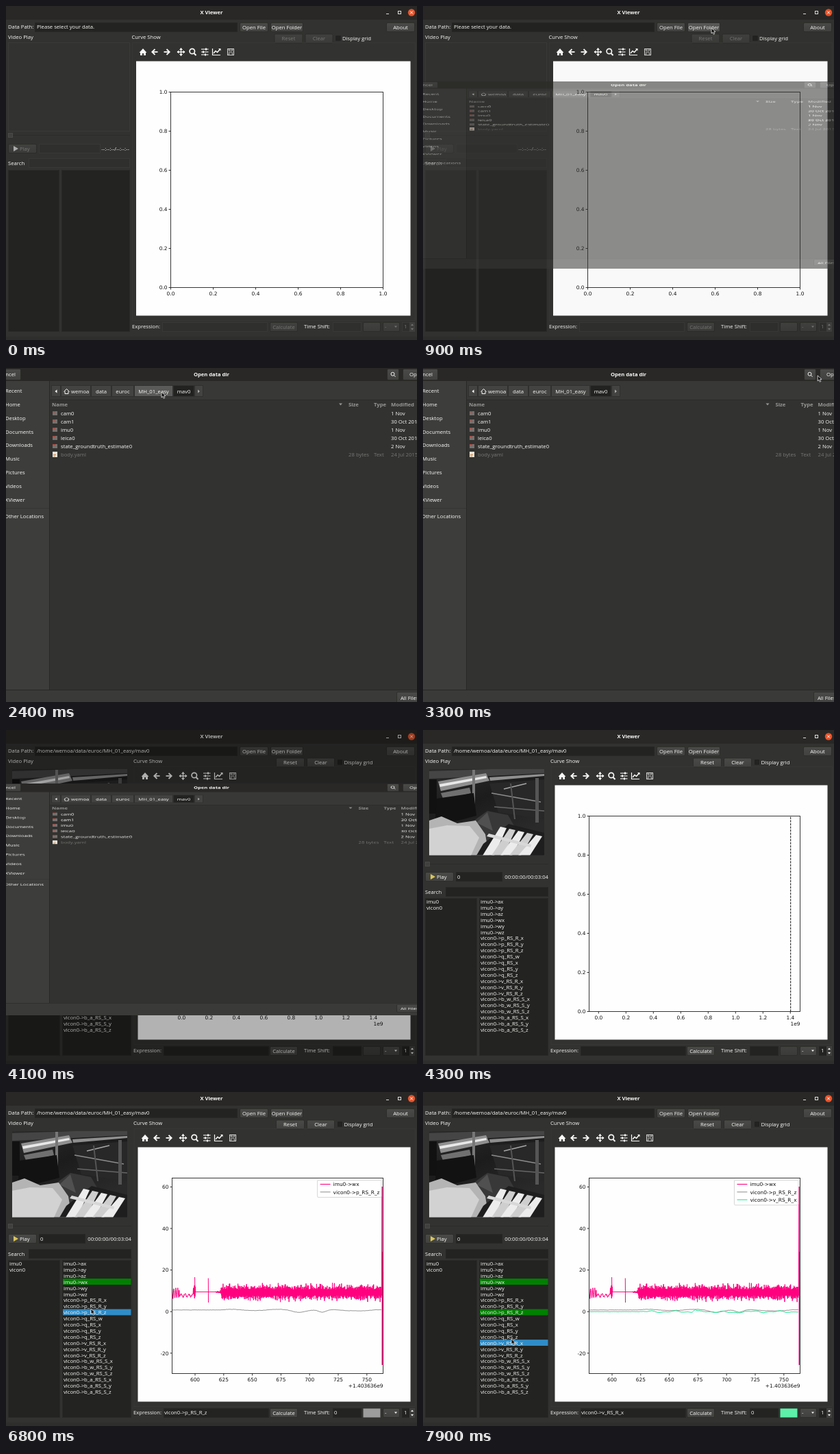
Animation, 600 px wide and 487 px high, one loop 8 s. Source, as an HTML page with a canvas:

```html
<!DOCTYPE html>
<html lang="en">
<head>
<meta charset="utf-8">
<title>X Viewer</title>
<style>
html, body { margin: 0; width: 100%; height: 100%; overflow: hidden; background: #323230; }
canvas { display: block; width: 600px; height: 487px; }
</style>
</head>
<body>
<canvas id="stage" width="600" height="487"></canvas>
<script>
const W = 600, H = 487, DIALOG_H = 496, LOOP = 8000, STEP = 100;
const screen2d = document.getElementById('stage').getContext('2d');
const layer = document.createElement('canvas');
layer.width = W; layer.height = DIALOG_H;
const layer2d = layer.getContext('2d');
let ctx = screen2d;

const UI = '7.7px "Open Sans", "Noto Sans", sans-serif';
const BOLD = 'bold 7.6px "Open Sans", "Noto Sans", sans-serif';
const PLOT = '7.4px "DejaVu Sans", sans-serif';
const BG = '#323230', FIELD = '#232321', TEXT = '#fafaf8', DIM = '#777775';
const USER = 'wemoa';
const DATA_PATH = `/home/${USER}/data/euroc/MH_01_easy/mav0`;

const axes3 = (prefix) => ['x', 'y', 'z'].map((a) => prefix + a);
const SIGNALS = [
  ...axes3('imu0->a'), ...axes3('imu0->w'), ...axes3('vicon0->p_RS_R_'),
  'vicon0->q_RS_w', ...axes3('vicon0->q_RS_'), ...axes3('vicon0->v_RS_R_'),
  ...axes3('vicon0->b_w_RS_S_'), ...axes3('vicon0->b_a_RS_S_')
];

function rect(x, y, w, h, fill, stroke) {
  if (fill) { ctx.fillStyle = fill; ctx.fillRect(x, y, w, h); }
  if (stroke) {
    ctx.strokeStyle = stroke; ctx.lineWidth = 1;
    ctx.strokeRect(x + .5, y + .5, w - 1, h - 1);
  }
}
function text(s, x, y, color = TEXT, align = 'left', font = UI) {
  ctx.font = font; ctx.fillStyle = color; ctx.textAlign = align;
  ctx.fillText(s, x, y + 2.8);
}
function trace(points) {
  ctx.beginPath();
  for (let i = 0; i < points.length; i += 2) ctx.lineTo(points[i], points[i + 1]);
}
function poly(points, fill) {
  trace(points); ctx.closePath(); ctx.fillStyle = fill; ctx.fill();
}
function line(points, color = TEXT, width = 1) {
  trace(points); ctx.strokeStyle = color; ctx.lineWidth = width; ctx.stroke();
}
function disc(x, y, r, fill, stroke, width = 1) {
  ctx.beginPath(); ctx.arc(x, y, r, 0, Math.PI * 2);
  if (fill) { ctx.fillStyle = fill; ctx.fill(); }
  if (stroke) { ctx.strokeStyle = stroke; ctx.lineWidth = width; ctx.stroke(); }
}
function button(label, x, y, w, h, on = true, hover = false) {
  const g = ctx.createLinearGradient(0, y, 0, y + h);
  g.addColorStop(0, hover ? '#5c5c5a' : on ? '#4a4a48' : '#41413f');
  g.addColorStop(1, hover ? '#50504e' : on ? '#41413f' : '#3a3a38');
  ctx.beginPath(); ctx.roundRect(x + .5, y + .5, w - 1, h - 1, 1.5);
  ctx.fillStyle = g; ctx.fill();
  ctx.strokeStyle = '#2a2a28'; ctx.lineWidth = .8; ctx.stroke();
  text(label, x + w / 2, y + h / 2, on ? TEXT : DIM, 'center');
}
const field = (x, y, w, h, on = true) => rect(x, y, w, h, on ? FIELD : '#2f2f2d', on ? '#272725' : '#383836');

function seeded(seed) {
  return () => {
    seed = (seed * 1664525 + 1013904223) >>> 0;
    return seed / 4294967296;
  };
}

// Gyro curve: calm start, two jolts, dense noise, then one huge spike.
function gyroPath() {
  const rnd = seeded(7), p = new Path2D();
  let sign = 1;
  for (let x = 242; x < 548.5; x += .35) {
    const r = rnd();
    let y;
    sign = -sign;
    if (x < 253) y = 293 + 7 * Math.sin(x * 2.3) + 4 * (r - .5);
    else if (x < 273.5) y = 296.5 + 2 * Math.sin(x * 1.1) + 3 * (r - .5);
    else if (x < 276.5) y = 289 + sign * 10 * (1 - Math.abs(x - 275.3) / 3) + r * 3;
    else if (x < 314) y = 291.5 + sign * (.4 + Math.max(0, x - 305) * .25 * r);
    else y = 292.3 + sign * (4 + 6 * r + 4 * r ** 14);
    p.lineTo(x, y);
  }
  for (const [x, y] of [[549, 138], [549.2, 398], [549.6, 233], [550, 320], [550.4, 262], [551, 293]]) p.lineTo(x, y);
  p.moveTo(275.6, 270); p.lineTo(275.8, 299);
  p.moveTo(295.3, 271.5); p.lineTo(295.5, 307);
  return p;
}
function slowPath(base, swell, seed) {
  const rnd = seeded(seed), p = new Path2D();
  for (let x = 242; x < 549; x++) {
    const moving = Math.min(1, Math.max(0, (x - 312) / 10));
    p.lineTo(x, base + moving * swell(x) + (rnd() - .5) * .5);
  }
  return p;
}
const bump = (x, c, w) => Math.exp(-(((x - c) / w) ** 2));
const CURVES = [
  { at: 5400, row: 3, color: '#ff007f', button: '#ff63b1', path: gyroPath() },
  { at: 6700, row: 8, color: '#969696', button: '#9c9c9c',
    path: slowPath(317.8, (x) => .9 * Math.sin(x / 11) + 2.6 * bump(x, 427, 12) + 4 * bump(x, 462, 8) + 1.6 * bump(x, 525, 15), 3) },
  { at: 7500, row: 13, color: '#1fe896', button: '#5cf0a8',
    path: slowPath(320.3, (x) => .9 * Math.sin(x / 6) + .6 * Math.sin(x / 2.7) - 3 * bump(x, 397, 2.5) + 1.5 * bump(x, 450, 9), 11) }
];

function windowButtons() {
  line([555, 11.5, 559, 11.5], '#ddd');
  ctx.strokeStyle = '#ddd'; ctx.lineWidth = 1; ctx.strokeRect(572.5, 7.5, 4, 4);
  disc(592, 9.5, 5.2, '#e5532a');
  line([590, 7.5, 594, 11.5], '#fff'); line([594, 7.5, 590, 11.5], '#fff');
}

function arrow(x, dir) {
  line([x - 4 * dir, 67, x + 4 * dir, 67], TEXT, 1.8);
  line([x, 63, x - 0 + 4.2 * dir, 67, x, 71], TEXT, 1.8);
}
function toolbar(dx) {
  ctx.save(); ctx.translate(dx, 0);
  poly([194.5, 68, 200, 62, 205.5, 68, 204, 68, 204, 72, 201, 72, 201, 69, 199, 69, 199, 72, 196, 72, 196, 68], TEXT);
  arrow(217.5, -1); arrow(234.5, 1);
  line([250, 67, 261, 67], TEXT, 1.4); line([255.5, 61.5, 255.5, 72.5], TEXT, 1.4);
  for (let i = 0; i < 4; i++) {
    ctx.save(); ctx.translate(255.5, 67); ctx.rotate(i * Math.PI / 2);
    poly([6, 0, 3, -2.5, 3, 2.5], TEXT); ctx.restore();
  }
  disc(271.8, 66, 3.7, null, TEXT, 1.7); line([274.5, 69, 277.5, 72], TEXT, 2);
  [[63, 292], [67, 288], [71, 291]].forEach(([y, x]) => {
    line([285, y, 295.5, y], TEXT, 1.1); rect(x - 1, y - 1.5, 2, 3, TEXT);
  });
  line([301.5, 62, 301.5, 71.5, 313, 71.5], TEXT, 1.2);
  line([303, 69, 306, 65.5, 308.5, 67.5, 312.5, 63], TEXT, 1.5); poly([310, 62, 313.5, 62, 313.5, 65.5], TEXT);
  ctx.strokeStyle = '#d8d8d6'; ctx.lineWidth = 1; ctx.strokeRect(323.5, 62.5, 9, 9);
  ctx.lineWidth = .8; ctx.strokeRect(325.5, 63, 5, 2.5); ctx.strokeRect(325.5, 68, 5, 3.5);
  ctx.restore();
}

function photo() {
  ctx.save();
  ctx.beginPath(); ctx.rect(9, 57, 168, 125.5); ctx.clip();
  const g = ctx.createLinearGradient(9, 57, 60, 183);
  g.addColorStop(0, '#2c2c2c'); g.addColorStop(.5, '#1c1c1c'); g.addColorStop(1, '#2a2a2a');
  rect(9, 57, 168, 126, g);
  poly([9, 60, 100, 57, 177, 57, 177, 63, 60, 69, 9, 71], '#454545');
  poly([22, 75, 92, 63, 97, 74, 26, 89], '#8f8f8f');
  poly([24, 79, 92, 67, 93, 70, 25, 83], '#e8e8e8');
  poly([97, 69, 177, 64, 177, 67, 98, 74], '#8f8f8f');
  poly([26, 92, 68, 84, 70, 92, 30, 102], '#707070');
  rect(9, 72, 11, 50, '#111'); rect(72, 58, 4, 52, '#777');
  poly([20, 100, 74, 92, 78, 125, 40, 135, 18, 128], '#121212');
  poly([97, 78, 177, 72, 177, 130, 110, 120], '#282828');
  line([100, 92, 172, 105], '#8c8c8c', 1.5); line([118, 86, 151, 78], '#a8a8a8', 1.5);
  line([104, 112, 177, 118], '#666', 1.5); line([128, 78, 134, 130], '#555', 2);
  rect(164, 70, 5, 65, '#555');
  poly([66, 138, 94, 118, 124, 124, 138, 148, 108, 160, 82, 166], '#383838');
  poly([78, 135, 94, 120, 102, 147], '#505050');
  poly([9, 132, 27, 126, 50, 136, 77, 132, 91, 152, 96, 183, 9, 183], '#b4b4b4');
  poly([9, 144, 35, 139, 68, 140, 82, 157, 70, 183, 9, 183], '#d2d2d2');
  poly([88, 166, 125, 137, 177, 150, 177, 183, 78, 183], '#1e1e1e');
  for (let i = 0; i < 5; i++) {
    const x = 113 + i * 13, y = 141 + i * 3;
    poly([x, y, x + 9, y + 2, x - 9, 183, x - 26, 183], i % 2 ? '#cecece' : '#ececec');
  }
  poly([96, 151, 158, 167, 157, 171, 93, 155], '#d8d8d8');
  ctx.restore();
}

function tick(label, x, y, vertical) {
  if (vertical) {
    line([x, y, x, y + 3], '#000', .8);
    text(label, x, y + 8.5, '#111', 'center', PLOT);
  } else {
    line([x - 3, y, x, y], '#000', .8);
    text(label, x - 5, y, '#111', 'right', PLOT);
  }
}
function legend(curves) {
  ctx.font = PLOT;
  const wide = Math.max(...curves.map((c) => ctx.measureText(SIGNALS[c.row]).width));
  const left = 545.5 - wide;
  ctx.beginPath(); ctx.roundRect(left - 23, 128.5, wide + 25.5, curves.length * 11.3 + 2.5, 1.5);
  ctx.fillStyle = 'rgba(255,255,255,.85)'; ctx.fill();
  ctx.strokeStyle = '#ccc'; ctx.lineWidth = .8; ctx.stroke();
  curves.forEach((c, i) => {
    const y = 134.5 + i * 11.3;
    line([left - 19, y, left - 4, y], c.color, 1.1);
    text(SIGNALS[c.row], left, y, '#111', 'left', PLOT);
  });
}
function plot(loaded, curves) {
  const x0 = loaded ? 242.5 : 240.5, x1 = 550.5, y0 = 125.5, y1 = 410.5;
  const left = loaded ? 192.5 : 190;
  rect(left, 80.5, 590.5 - left, 371, '#fefefe');
  if (curves.length) {
    for (let v = 600; v <= 750; v += 25) tick(v, 276 + (v - 600) * 1.672, y1, true);
    for (let v = -20; v <= 60; v += 20) tick(v, x0, 320.2 - v * 3.03, false);
    text('+1.403636e9', x1, 428.5, '#111', 'right', PLOT);
    ctx.save(); ctx.beginPath(); ctx.rect(x0, y0, x1 - x0, y1 - y0); ctx.clip();
    ctx.lineWidth = 1; ctx.lineJoin = 'round';
    curves.forEach((c) => { ctx.strokeStyle = c.color; ctx.stroke(c.path); });
    ctx.restore();
  } else {
    const n = loaded ? 7 : 5;
    for (let i = 0; i <= n; i++) tick((i * .2).toFixed(1), loaded ? 256.3 + i * 40 : x0 + i * 62, y1, true);
    for (let i = 0; i <= 5; i++) tick((i * .2).toFixed(1), x0, y1 - i * 57, false);
    if (loaded) {
      text('1e9', x1, 428.5, '#111', 'right', PLOT);
      ctx.setLineDash([3.2, 1.4]); line([536.7, y1, 536.7, y0], '#111', 1); ctx.setLineDash([]);
    }
  }
  ctx.strokeStyle = '#222'; ctx.lineWidth = .9; ctx.strokeRect(x0, y0, x1 - x0, y1 - y0);
  if (curves.length) legend(curves);
}

function leftPane(loaded, curves) {
  const dy = loaded ? 7 : 0, right = loaded ? 183 : 181;
  text('Video Play', 3, 45);
  if (loaded) photo(); else rect(3, 53, 178, 130, null, '#3a3a38');
  rect(10, 188 + dy, right - 10, 1, '#2b2b29'); rect(3, 185 + dy, 7, 7, '#40403e', '#4a4a48');
  const py = loaded ? 207 : 201;
  button('', 3, py, 42, 14, loaded);
  poly([11, py + 3, 18, py + 7, 11, py + 11], loaded ? '#d8c45a' : '#aaa');
  text('Play', 20, py + 7, loaded ? TEXT : DIM);
  field(48, py, loaded ? 68 : 90, 14, loaded);
  if (loaded) text('0', 50, py + 7);
  text(loaded ? '00:00:00/00:03:04' : '--:--:--/--:--:--', loaded ? 183 : 180, py + 7, TEXT, 'right');
  text('Search', 3, 229 + dy);
  field(33, 222 + dy, right - 33, 14, loaded);
  const top = loaded ? 245 : 239, mid = loaded ? 82 : 81;
  rect(3, top, mid - 6, 475 - top, FIELD, '#292927');
  rect(mid, top, right - mid, 475 - top, FIELD, '#292927');
  if (!loaded) return;
  text('imu0', 5, 250); text('vicon0', 5, 259);
  curves.forEach((c, i) => rect(83, 245.4 + c.row * 8.9, 99.5, 8.9, i === curves.length - 1 ? '#308cc6' : '#008000'));
  SIGNALS.forEach((s, i) => text(s, 84, 250.2 + i * 8.9));
}

function bottomRow(loaded, curves) {
  const last = curves[curves.length - 1], dx = loaded ? 2 : 0, color = loaded ? TEXT : DIM;
  text('Expression:', 184 + dx, 467.5);
  field(228 + dx, 461, 154, 14, loaded);
  button('Calculate', 385, 461, 41, 14, loaded);
  text('Time Shift:', 435, 467.5);
  field(477, 461, 42, 14, loaded);
  button('', 521, 461, 26, 14, false);
  button('', 550, 461, 25, 14, loaded);
  text('-', 553, 467.5, color);
  poly([567, 466.5, 571, 466.5, 569, 469], color);
  field(578, 461, 19, 14, loaded);
  text('1', 581, 467.5, color);
  rect(589, 461, 8, 14, '#3f3f3d');
  poly([591, 466, 595, 466, 593, 463.5], color); poly([591, 470, 595, 470, 593, 472.5], color);
  if (!last) return;
  text(SIGNALS[last.row], 231, 467.5);
  text('0', 479, 467.5);
  rect(521.5, 461.5, 25, 13, last.button);
}

function mainWindow(loaded, curves, hover) {
  const dx = loaded ? 2.5 : 0;
  rect(0, 0, W, H, BG);
  rect(0, 0, W, 20, '#292826');
  text('X Viewer', 300, 9.5, TEXT, 'center', BOLD);
  windowButtons();
  text('Data Path:', 3, 30.5);
  field(42, 24, 296, 14);
  text(loaded ? DATA_PATH : 'Please select your data.', 45, 30.5);
  button('Open File', 341, 24, 42, 14);
  button('Open Folder', 386, 24, 48, 14, true, hover);
  button('About', 555, 24, 42, 14);
  text('Curve Show', 183.5 + dx, 45);
  button('Reset', 391.5 + dx, 40.5, 42, 14, loaded);
  button('Clear', 436.5 + dx, 40.5, 41, 14, loaded);
  rect(481.5 + dx, 43.5, 7, 7, '#232321', '#202020');
  text('Display grid', 491 + dx, 47.5);
  rect(184 + dx, 53, 414 - dx, 406, null, '#373735');
  toolbar(loaded ? 3 : 0);
  plot(loaded, curves);
  leftPane(loaded, curves);
  bottomRow(loaded, curves);
  rect(0, 482, W, 5, '#2e2e2c');
}

const FILES = [['cam0', '1 Nov'], ['cam1', '30 Oct 2015'], ['imu0', '1 Nov'], ['leica0', '30 Oct 2015'],
  ['state_groundtruth_estimate0', '2 Nov'], ['body.yaml', '24 Jul 2015']];
const PLACES = ['Recent', 'Home', 'Desktop', 'Documents', 'Downloads', 'Music', 'Pictures', 'Videos', 'XViewer'];

function pathBar(hover) {
  const crumbs = [['', 66, 14], ['', 80, 44], ['data', 124, 30], ['euroc', 154, 33], ['MH_01_easy', 187, 57], ['mav0', 244, 31], ['', 275, 13]];
  crumbs.forEach(([label, x, w]) => {
    const fill = label === 'mav0' ? '#222220' : hover && label === 'MH_01_easy' ? '#5a5a58' : '#434341';
    rect(x, 25, w, 17, fill, '#30302e');
    text(label, x + w / 2, 34, TEXT, 'center');
  });
  poly([74.5, 31.5, 74.5, 36.5, 71.5, 34], TEXT);
  poly([280, 31.5, 280, 36.5, 283, 34], '#aaa');
  line([84.5, 34.5, 88.5, 30.5, 92.5, 34.5], TEXT); line([86, 34, 86, 37.5, 91, 37.5, 91, 34], TEXT);
  text(USER, 95, 34);
}
function dialog(dx, hover) {
  const grey = '#979795', small = 'bold ' + UI;
  rect(0, 0, W, DIALOG_H, BG);
  rect(0, 0, W, 19, '#292826');
  button('', -30, 1, 52, 17); text('Cancel', 14, 9.5, TEXT, 'right');
  text('Open data dir', 300, 9.5, TEXT, 'center', BOLD);
  button('', 556, 1, 18, 17);
  disc(564.5, 8.8, 2.5, null, TEXT); line([566.5, 10.8, 568.5, 12.8], TEXT);
  button('', 579, 1, 60, 17); text('Open', 589, 9.5);
  rect(0, 19, 63, 450, '#3d3d3b'); rect(63, 19, 1, 450, '#282826');
  PLACES.forEach((p, i) => text(p, -1, 33 + i * 19.9));
  rect(0, 204, 63, 1, '#353533');
  text('Other Locations', -2, 216.5);
  rect(64, 19, W, 28, '#383836'); rect(64, 46, W, 1, '#2b2b29');
  pathBar(hover);
  text('Name', 67, 53, grey, 'left', small);
  poly([486 + dx, 51.5, 491 + dx, 51.5, 488.5 + dx, 54.5], grey);
  text('Size', 500 + dx, 53, grey, 'left', small);
  text('Type', 537 + dx, 53, grey, 'left', small);
  text('Modified', 562 + dx, 53, grey, 'left', small);
  FILES.forEach(([name, date], i) => {
    const y = 66 + i * 12, isFile = i === 5, color = isFile ? DIM : TEXT;
    if (isFile) {
      rect(68, y - 4, 7, 8, '#e8e2d8'); rect(69, y, 4, 1, '#d0803c'); rect(69, y + 2, 3, 1, '#c8a070');
    } else {
      rect(68, y - 3, 7, 6, '#74716f'); rect(68, y - 3, 4, 1.5, '#b5473c');
    }
    text(name, 80, y, color);
    text(date, 562 + dx, y, color);
  });
  text('28 bytes', 530 + dx, 126, DIM, 'right');
  text('Text', 537 + dx, 126, DIM);
  rect(0, 469, W, 27, '#3a3a38'); rect(0, 469, W, 1, '#272725');
  button('', 570, 472, 60, 17); text('All Files', 576, 481);
}

const CURSOR = [[100, 520, 200], [700, 421, 32], [1200, 421, 32], [1800, 262, 72], [2200, 227, 35], [2800, 227, 35],
  [3400, 604, 9], [4400, 604, 9], [5200, 123, 271], [6000, 123, 271], [6500, 124, 316], [7000, 124, 316], [7400, 129, 360], [8000, 129, 360]];
const SCALE = [[800, 0], [900, .55], [1000, .88], [1100, 1], [3900, 1], [4000, .9], [4100, .683], [4200, .32], [4300, 0]];
const SHADE = [[800, 0], [900, .02], [1100, .3], [4100, .3], [4300, 0]];

function sample(keys, t, ease = (u) => u) {
  if (t <= keys[0][0]) return keys[0].slice(1);
  const i = keys.findIndex((k) => k[0] >= t);
  if (i < 0) return keys[keys.length - 1].slice(1);
  const a = keys[i - 1], b = keys[i], u = ease((t - a[0]) / (b[0] - a[0]));
  return a.slice(1).map((v, j) => v + (b[j + 1] - v) * u);
}

function pointer(x, y) {
  ctx.save(); ctx.translate(x, y);
  const shape = [0, 0, 0, 8, 1.9, 6.4, 3.2, 9.3, 4.7, 8.6, 3.5, 5.8, 6, 5.6];
  poly(shape, '#111');
  line([...shape, 0, 0], '#eee', .8);
  ctx.restore();
}

// The dialog opens and closes by squashing towards its middle; it fades only on opening.
function showDialog(scale, alpha, dx, hover) {
  const middle = 244.5;
  ctx = layer2d;
  dialog(dx, hover);
  ctx = screen2d;
  ctx.globalAlpha = alpha;
  ctx.drawImage(layer, 0, middle * (1 - scale), W, DIALOG_H * scale);
  ctx.globalAlpha = 1;
}

function draw(t) {
  const [cx, cy] = sample(CURSOR, t, (u) => u * u * (3 - 2 * u));
  const over = (x, y, w, h) => cx >= x && cx < x + w && cy >= y && cy < y + h;
  const [scale] = sample(SCALE, t), [shade] = sample(SHADE, t);
  const opening = t < 2000;
  mainWindow(!opening, CURVES.filter((c) => t >= c.at), opening && over(386, 24, 48, 14));
  if (shade) rect(0, 0, W, H, `rgba(0,0,0,${shade})`);
  if (scale) showDialog(scale, opening ? scale : 1, t >= 2900 ? 14.5 : 0, over(187, 25, 57, 17));
  if (t >= 100) pointer(cx, cy);
}

function frame() {
  draw(Math.floor(performance.now() % LOOP / STEP) * STEP);
  requestAnimationFrame(frame);
}
frame();
</script>
</body>
</html>
```
